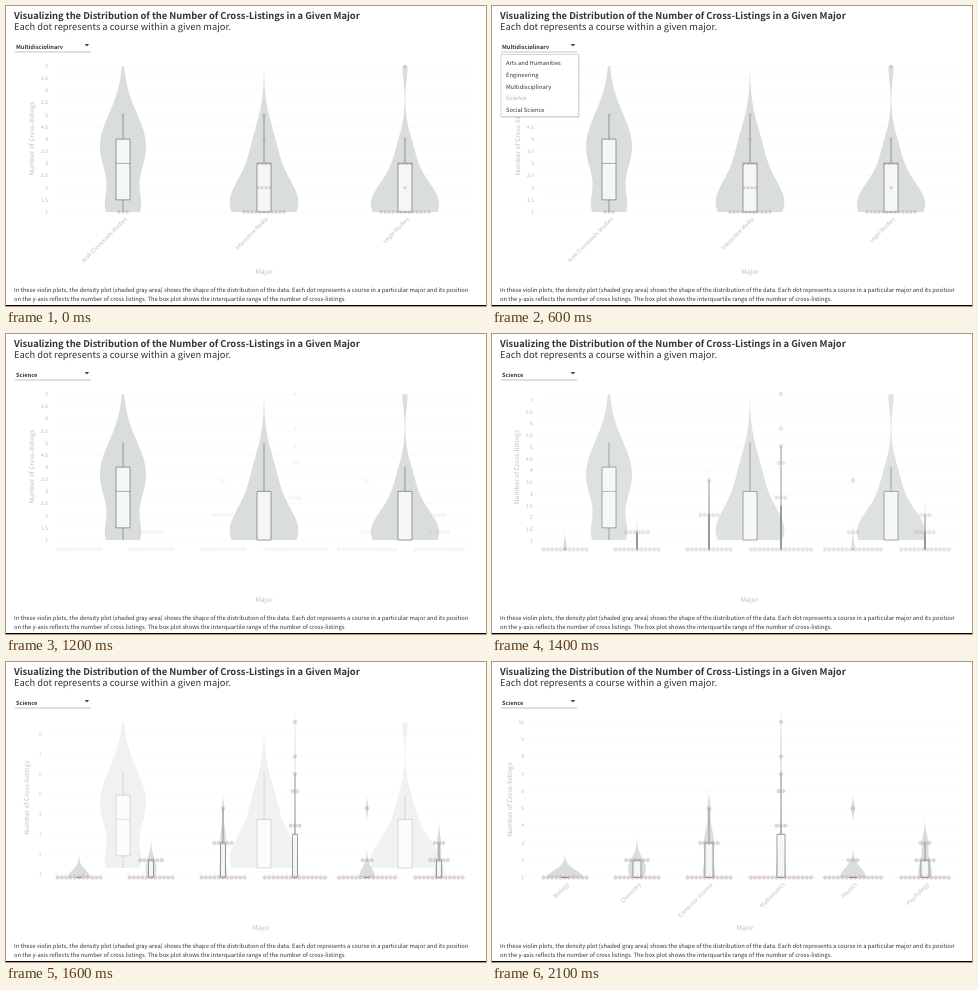
Animation, 480 px wide and 300 px high, one loop 2.2 s. Source, as an HTML page:

```html
<!DOCTYPE html>
<html lang="en">
<head>
<meta charset="utf-8">
<title>Cross-listings by major</title>
<style>
  html, body { margin: 0; width: 100%; height: 100%; overflow: hidden; background: #fff; }
  svg { display: block; width: 480px; height: 300px; }
  text {
    font-family: "Noto Sans CJK JP", "Noto Sans CJK SC", "Noto Sans CJK", "Open Sans", sans-serif;
    font-size: 5.81px; fill: #333; text-rendering: geometricPrecision;
  }
  .heading { font-size: 9.33px; }
  .bold { font-weight: 700; }
  .value { font-size: 5.67px; font-weight: 700; }
  .tick { font-size: 5px; fill: #b6b6b6; text-anchor: end; }
  .major { font-size: 5.45px; fill: #b9b9b9; text-anchor: end; }
  .axis { font-size: 6.5px; fill: #bdbdbd; text-anchor: middle; }
  .grid { stroke: #fafafa; stroke-width: .7; }
  .violin { fill: #d9dedd; }
  .box, .whisker { stroke: #808080; stroke-width: .8; vector-effect: non-scaling-stroke; }
  .box { fill: #fff; fill-opacity: .75; }
  .median { stroke: #999; stroke-width: .8; }
  .dot { fill: #a9a3a3; fill-opacity: .4; stroke: #d48f88; stroke-opacity: .3; stroke-width: .5; }
</style>
</head>
<body>
<svg viewBox="0 0 480 300">
  <defs><clipPath id="valueClip"><rect x="8" y="34" width="66" height="9"/></clipPath></defs>
  <text class="heading bold" x="8" y="13.2">Visualizing the Distribution of the Number of Cross-Listings in a Given Major</text>
  <text class="heading" x="8" y="24.3">Each dot represents a course within a given major.</text>
  <g id="chart"></g>
  <text x="8" y="286.3">In these violin plots, the density plot (shaded gray area) shows the shape of the distribution of the data. Each dot represents a course in a particular major and its position</text>
  <text x="8" y="294.8">on the y-axis reflects the number of cross listings. The box plot shows the interquartile range of the number of cross-listings.</text>
  <text id="value" class="value" x="10" y="42.7" clip-path="url(#valueClip)"></text>
  <path d="M78.6 38h4.6l-2.3 2.4z" fill="#444"/>
  <path d="M9 46h76" stroke="#aaa" stroke-width=".7"/>
  <g id="menu">
    <rect x="9.5" y="49.5" width="78" height="62.5" opacity=".1"/>
    <rect x="9" y="48.5" width="77.5" height="62" fill="#fff" stroke="#ccc" stroke-width=".8"/>
  </g>
  <rect y="299" width="480" height="1"/>
</svg>
<script>
const LOOP = 2200, STEP = 100;
const byId = id => document.getElementById(id);
const clamp = v => Math.max(0, Math.min(1, v));
const mix = (a, b, p) => a + (b - a) * p;
const cubicInOut = t => t < .5 ? 4 * t ** 3 : 1 - 4 * (1 - t) ** 3;

function add(parent, tag, attrs = {}, label) {
  const node = document.createElementNS('http://www.w3.org/2000/svg', tag);
  for (const key in attrs) node.setAttribute(key, attrs[key]);
  if (label !== undefined) node.textContent = label;
  parent.append(node);
  return node;
}

const before = { base: 206, unit: 24.3, max: 7, half: 7, gap: 4, radius: 1.5, first: 117, spacing: 141 };
const after = { base: 215.5, unit: 17.28, max: 10.5, half: 4, gap: 4.3, radius: 1.9, first: 73, spacing: 72 };

// bumps: density as Gaussians [center, half width, spread]
// box: [lower quartile, upper quartile, upper whisker]; counts: dots at 1, 2, 3 ...
const beforeMajors = [
  { name: 'Arab Crossroads Studies', bumps: [[3.7, 23, 1.35], [1.1, 14, .7]],
    box: [1.5, 4, 5], median: 3, counts: [3, 0, 0, 0, 1] },
  { name: 'Interactive Media', bumps: [[1.3, 33, 1.05], [3.6, 11, 1.1]],
    box: [1, 3, 5], counts: [11, 4, 4, 1, 1] },
  { name: 'Legal Studies', bumps: [[1.3, 34, 1], [3.5, 7, .8], [7, 2.6, .6]],
    box: [1, 3, 4], counts: [13, 1, 4, 1, 0, 0, 1] }
];
const afterMajors = [
  { name: 'Biology', bumps: [[1, 18, .42]], box: [1, 1, 1], counts: [11] },
  { name: 'Chemistry', bumps: [[1.5, 9, .6]], box: [1, 2, 2], counts: [11, 6] },
  { name: 'Computer Science', bumps: [[1, 6, .8], [3, 5, .8], [5, 1.5, .4]],
    box: [1, 3, 5], counts: [11, 0, 5, 0, 1] },
  { name: 'Mathematics', bumps: [[1, 5, 1.6], [8, .8, 1.5]],
    box: [1, 3.5, 7], counts: [15, 0, 0, 3, 0, 2, 1, 1, 0, 1] },
  { name: 'Physics', bumps: [[1, 13, .55], [5, 2, .3]], box: [1, 1, 1], counts: [14, 3, 0, 0, 1] },
  { name: 'Psychology', bumps: [[1.3, 7, .7], [3, 3, .5]], box: [1, 2, 3], counts: [12, 5, 3] }
];

const chart = byId('chart');

function buildAxis(max, step) {
  const group = add(chart, 'g'), ticks = [];
  for (let v = 1; v <= max; v += step) {
    ticks.push({ v, line: add(group, 'path', { class: 'grid' }),
      label: add(group, 'text', { class: 'tick' }, v) });
  }
  return { group, ticks };
}

function violinPath(bumps, max, y) {
  const left = [], right = [];
  for (let v = 1; v <= max; v += .1) {
    const w = bumps.reduce((sum, [center, size, spread]) =>
      sum + size * Math.exp(-(((v - center) / spread) ** 2) / 2), 0);
    right.push([w, y(v)]);
    left.unshift([-w, y(v)]);
  }
  return `M${right.concat(left).join('L')}Z`;
}

function buildPlot(scale, majors) {
  const y = v => scale.base - scale.unit * (v - 1);
  const shapes = add(chart, 'g'), dots = add(chart, 'g'), names = add(chart, 'g');
  const columns = majors.map(({ name, bumps, box, median, counts }, i) => {
    const x = scale.first + scale.spacing * i, h = scale.half;
    const [low, high, top] = box.map(y);
    const node = add(shapes, 'g');
    add(node, 'path', { class: 'violin', d: violinPath(bumps, scale.max, y) });
    add(node, 'path', { class: 'whisker', d: `M0 ${top}V${high}M0 ${low}V${scale.base}` });
    add(node, 'path', { class: 'box', d: `M${-h} ${high}H${h}V${low}H${-h}Z` });
    if (median) add(node, 'path', { class: 'median', d: `M${-h} ${y(median)}H${h}` });
    counts.forEach((count, level) => {
      for (let k = 0; k < count; k++) {
        add(dots, 'circle', { class: 'dot', r: scale.radius,
          cx: x + (k - (count - 1) / 2) * scale.gap, cy: y(level + 1) });
      }
    });
    add(names, 'text', { class: 'major',
      transform: `translate(${x + 4.2} ${scale.base + 7.5}) rotate(-45)` }, name);
    return { x, node };
  });
  return { shapes, dots, names, columns };
}

const beforeAxis = buildAxis(7, .5), afterAxis = buildAxis(10, 1);
const beforePlot = buildPlot(before, beforeMajors), afterPlot = buildPlot(after, afterMajors);
const yTitle = add(chart, 'text', { class: 'axis' }, 'Number of Cross-listings');
const xTitle = add(chart, 'text', { class: 'axis', y: 268.3 }, 'Major');

const menu = byId('menu'), value = byId('value');
const items = ['Arts and Humanities', 'Engineering', 'Multidisciplinary', 'Science', 'Social Science']
  .map((label, i) => add(menu, 'text', { x: 14, y: 59 + 11.8 * i }, label));

const fade = (node, opacity) => node.setAttribute('opacity', opacity);
const widen = (columns, width) => columns.forEach(({ x, node }) =>
  node.setAttribute('transform', `translate(${x} 0) scale(${width} 1)`));

function moveAxis({ group, ticks }, p, opacity) {
  fade(group, opacity);
  const base = mix(before.base, after.base, p), unit = mix(before.unit, after.unit, p);
  for (const { v, line, label } of ticks) {
    const y = base - unit * (v - 1), shown = y > 52 ? 1 : 0;
    line.setAttribute('d', `M${mix(48, 37, p)} ${y}H468`);
    label.setAttribute('x', mix(42, 32, p));
    label.setAttribute('y', y + 1.8);
    fade(line, shown);
    fade(label, shown);
  }
}

function draw(t) {
  const p = cubicInOut(clamp((t - 1140) / 850));
  const switched = t >= 1100, detailed = t < 1200 ? 1 : 0;

  value.textContent = switched ? 'Science' : 'Multidisciplinary';
  fade(menu, switched ? 0 : clamp(t / 200));
  items[3].style.fill = t >= 400 ? '#b0b0b0' : '';

  moveAxis(beforeAxis, p, t < 1500 ? 1 : clamp(1 - 2 * p));
  moveAxis(afterAxis, p, t < 1500 ? 0 : clamp(p + .15));
  yTitle.setAttribute('transform',
    `translate(${mix(28, 19.5, p)} ${mix(132.5, 137.5, p)}) rotate(-90)`);
  xTitle.setAttribute('x', mix(258, 253, p));

  fade(beforePlot.shapes, p > .9 ? 0 : 1 - p);
  fade(beforePlot.dots, detailed);
  fade(beforePlot.names, detailed);
  widen(beforePlot.columns, 1);

  fade(afterPlot.shapes, clamp(p * 9));
  fade(afterPlot.dots, clamp((t - 1100) / 450));
  fade(afterPlot.names, clamp((t - 1800) / 200));
  widen(afterPlot.columns, p);
}

function frame(now) {
  draw(Math.floor(now % LOOP / STEP) * STEP);
  requestAnimationFrame(frame);
}
draw(0);
requestAnimationFrame(frame);
</script>
</body>
</html>
```
